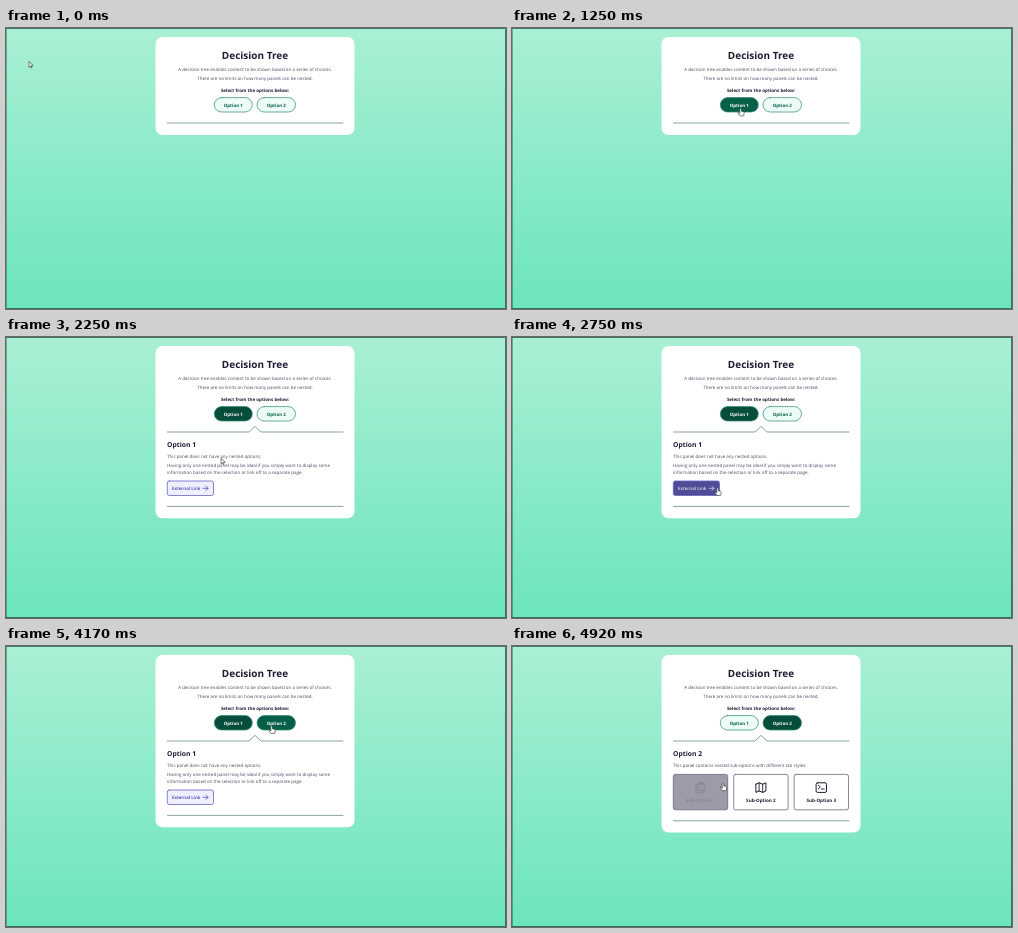
These frames come from a looping animation (500x281 px, 5.01 s). An HTML page with a canvas:

```html
<!DOCTYPE html>
<html lang="en">
<head>
<meta charset="utf-8">
<title>Decision Tree</title>
<style>
  html, body { margin: 0; width: 100%; height: 100%; overflow: hidden; }
  canvas { display: block; width: 500px; height: 281px; }
</style>
</head>
<body>
<canvas id="stage"></canvas>
<script>
const W = 500, H = 281, LOOP = 5010, STEP = 1000 / 12;
const canvas = document.getElementById('stage');
const ctx = canvas.getContext('2d');
const dpr = window.devicePixelRatio || 1;
canvas.width = Math.round(W * dpr);
canvas.height = Math.round(H * dpr);

const INK = [30, 27, 51], BODY = '#4a4760', WHITE = [255, 255, 255];
const MINT = [238, 252, 247], GREEN = [6, 95, 72], DEEP = [6, 78, 59];
const LILAC = [238, 240, 254], INDIGO = [49, 46, 129], VIOLET = [67, 56, 180];
const SLATE = [45, 42, 75], RULE = '#7c9b94';

// Step numbers at which the state changes
const HOVER_1 = 9, CLICK_1 = 20, LINK_IN = 30, LINK_OUT = 42;
const HOVER_2 = 47, CLICK_2 = 51, HOVER_SUB = 57;

const BTN_1 = [208.3, 69.6, 38, 14.4], BTN_2 = [251, 69.6, 38.5, 14.4];
const LINK = [161.3, 144, 46.2, 14.5];
const SUBS = [161.3, 221.7, 282.1].map(x => [x, 128.4, 54.4, 35.4]);

// Pointer stops: step, x, y
const STOPS = [
  [0, 23, 34], [7, 191, 78], [14, 228.5, 80.5], [22, 228.5, 80.5],
  [31, 205.5, 151], [40, 205.5, 151], [45, 260.5, 91], [47, 264, 83],
  [49, 265.5, 80], [53, 265.5, 80], [57, 214, 137], [59, 211, 137.3]
];

const clamp = v => Math.max(0, Math.min(1, v));
const ramp = (k, start, len) => clamp((k - start) / len);
const easeOut = p => 1 - (1 - p) * (1 - p);
const fade = (k, start, len = 3) => easeOut(ramp(k, start, len));
const mix = (a, b, p) => a.map((v, i) => v + (b[i] - v) * p);
const rgb = c => `rgb(${c.map(Math.round).join(',')})`;
const inside = ([x, y, w, h], px, py) => px > x && px < x + w && py > y && py < y + h;

// Laid out at ten times the size so glyph advances are not rounded
function text(str, x, y, size, weight, color, align = 'left') {
  ctx.save();
  ctx.translate(x, y);
  ctx.scale(0.1, 0.1);
  ctx.font = `${weight} ${size * 10}px "Open Sans", "Noto Sans", sans-serif`;
  ctx.textAlign = align;
  ctx.fillStyle = color;
  ctx.fillText(str, 0, 0);
  ctx.restore();
}

function box([x, y, w, h], r, fill, stroke, line = 0.8) {
  ctx.beginPath();
  ctx.roundRect(x, y, w, h, r);
  ctx.fillStyle = fill;
  ctx.fill();
  if (!stroke) return;
  ctx.strokeStyle = stroke;
  ctx.lineWidth = line;
  ctx.stroke();
}

function poly(points, color, width) {
  ctx.beginPath();
  points.forEach(([x, y], i) => i ? ctx.lineTo(x, y) : ctx.moveTo(x, y));
  ctx.strokeStyle = color;
  ctx.lineWidth = width;
  ctx.stroke();
}

const rule = y => poly([[161.5, y], [337, y]], RULE, 0.9);

function pill(rect, label, fill, ink) {
  box(rect, 7.2, rgb(fill), '#2f8a72', 0.7);
  text(label, rect[0] + rect[2] / 2, 78.5, 4.5, 700, rgb(ink), 'center');
}

// Icons are drawn in an 11 x 11 field centred on the origin
const icons = [
  c => {
    poly([[-2.5, -3], [-4.6, -3], [-4.6, 5], [2.5, 5], [2.5, 3.2]], c, 0.9);
    poly([[-2.5, -4], [-2.5, 3], [4.6, 3], [4.6, -4], [-2.5, -4]], c, 0.9);
    poly([[-0.5, -5], [2.6, -5], [2.6, -3], [-0.5, -3], [-0.5, -5]], c, 0.9);
    poly([[-0.8, 0], [0.6, 1.3], [3, -1.2]], c, 0.8);
  },
  c => {
    poly([[-5, -3.4], [-1.8, -4.8], [1.8, -3.4], [5, -4.8], [5, 3.4],
      [1.8, 4.8], [-1.8, 3.4], [-5, 4.8], [-5, -3.4]], c, 1);
    poly([[-1.8, -4.8], [-1.8, 3.4]], c, 0.9);
    poly([[1.8, -3.4], [1.8, 4.8]], c, 0.9);
  },
  c => {
    ctx.beginPath();
    ctx.roundRect(-5.2, -4.8, 10.4, 9.6, 1.4);
    ctx.strokeStyle = c;
    ctx.lineWidth = 1;
    ctx.stroke();
    poly([[-3, -2.4], [-1, -0.6], [-3, 1.2]], c, 0.9);
    poly([[0, 1.4], [3, 1.4]], c, 0.9);
  }
];

function panelOne(k) {
  const p = fade(k, LINK_IN, 5) * (1 - fade(k, LINK_OUT));
  text('Option 1', 161, 109.6, 6.8, 700, rgb(INK));
  text('This panel does not have any nested options.', 161, 120.6, 4.5, 400, BODY);
  text('Having only one nested panel may be ideal if you simply want to display some',
    161, 130, 4.5, 400, BODY);
  text('information based on the selection or link off to a separate page.',
    161, 137, 4.5, 400, BODY);
  const ink = rgb(mix(VIOLET, WHITE, p));
  box(LINK, 2, rgb(mix(LILAC, INDIGO, p)), '#6a64c4', 0.8);
  text('External Link', 166, 152.9, 4.5, 600, ink);
  poly([[197, 151.3], [202, 151.3]], ink, 0.7);
  poly([[199.8, 149.1], [202, 151.3], [199.8, 153.5]], ink, 0.7);
  rule(169.4);
}

function panelTwo(k) {
  text('Option 2', 161, 109.6, 6.8, 700, rgb(INK));
  text('This panel contains nested sub-options with different tab styles:',
    161, 120.6, 4.5, 400, BODY);
  SUBS.forEach((rect, i) => {
    const p = i ? 0 : ramp(k, HOVER_SUB, 4.25);
    const ink = rgb(mix(INK, WHITE, p));
    const cx = rect[0] + rect[2] / 2;
    box(rect, 2, rgb(mix(WHITE, SLATE, p)), '#6b6980', 0.8);
    ctx.save();
    ctx.translate(cx, 141.6);
    icons[i](ink);
    ctx.restore();
    text('Sub-Option ' + (i + 1), cx, 156, 4.6, 700, ink, 'center');
  });
  rule(174.8);
}

function pointerAt(k) {
  const i = Math.max(1, STOPS.findIndex(s => s[0] >= k));
  const [k0, x0, y0] = STOPS[i - 1], [k1, x1, y1] = STOPS[i];
  const p = ramp(k, k0, k1 - k0), e = p * p * (3 - 2 * p);
  return [x0 + (x1 - x0) * e, y0 + (y1 - y0) * e];
}

const ARROW = new Path2D('M0 0V5.2L1.3 4.1L2.2 6L3 5.6L2.2 3.8L3.8 3.7Z');
const HAND = new Path2D('M-.8 .7Q0-.5 .8 .7V2.7L3 3.2Q3.8 3.4 3.7 4.3L3.2 7.4H-.6' +
  'L-2.5 4.7Q-2.7 3.7-1.7 3.9L-.8 4.7Z');

function pointer(k, panel) {
  const [x, y] = pointerAt(k);
  const targets = [BTN_1, BTN_2];
  if (panel === 1) targets.push(LINK);
  if (panel === 2) targets.push(...SUBS);
  const shape = targets.some(r => inside(r, x, y)) ? HAND : ARROW;
  ctx.save();
  ctx.translate(x, y);
  ctx.fillStyle = '#fff';
  ctx.strokeStyle = '#25302d';
  ctx.lineWidth = 0.6;
  ctx.fill(shape);
  ctx.stroke(shape);
  ctx.restore();
}

function draw(k) {
  const panel = k >= CLICK_2 ? 2 : k >= CLICK_1 ? 1 : 0;
  ctx.setTransform(dpr, 0, 0, dpr, 0, 0);
  ctx.textRendering = 'geometricPrecision';
  ctx.lineJoin = ctx.lineCap = 'round';

  const sky = ctx.createLinearGradient(0, 0, 0, H);
  sky.addColorStop(0, '#a9f0d3');
  sky.addColorStop(1, '#6ce5bc');
  ctx.fillStyle = sky;
  ctx.fillRect(0, 0, W, H);
  ctx.strokeStyle = 'rgba(18,58,48,.65)';
  ctx.lineWidth = 1;
  ctx.strokeRect(0.5, 0.5, W - 1, H - 1);

  box([149.5, 9, 199, [98, 172.2, 177.5][panel]], 7, '#fff');
  text('Decision Tree', 249, 31, 10, 700, rgb(INK), 'center');
  text('A decision tree enables content to be shown based on a series of choices.',
    249, 42.6, 4.5, 400, BODY, 'center');
  text('There are no limits on how many panels can be nested.',
    249, 52.2, 4.5, 400, BODY, 'center');
  text('Select from the options below:', 249, 64, 4.5, 700, rgb(INK), 'center');

  const leave = fade(k, CLICK_2), on1 = fade(k, HOVER_1) * (1 - leave);
  const on2 = fade(k, HOVER_2 - 1);
  pill(BTN_1, 'Option 1', mix(MINT, mix(GREEN, DEEP, fade(k, CLICK_1)), on1),
    mix(GREEN, WHITE, on1));
  pill(BTN_2, 'Option 2', mix(MINT, mix(GREEN, DEEP, leave), on2),
    mix(GREEN, WHITE, on2));

  if (panel) {
    poly([[161.5, 95], [243, 95], [249, 89.4], [255, 95], [337, 95]], RULE, 0.9);
    (panel === 1 ? panelOne : panelTwo)(k);
  } else {
    rule(95);
  }
  pointer(k, panel);
}

function tick(now) {
  const t = now % LOOP;
  draw(Math.min(59, Math.floor((t + 5) / STEP)));
  requestAnimationFrame(tick);
}
requestAnimationFrame(tick);
</script>
</body>
</html>
```
